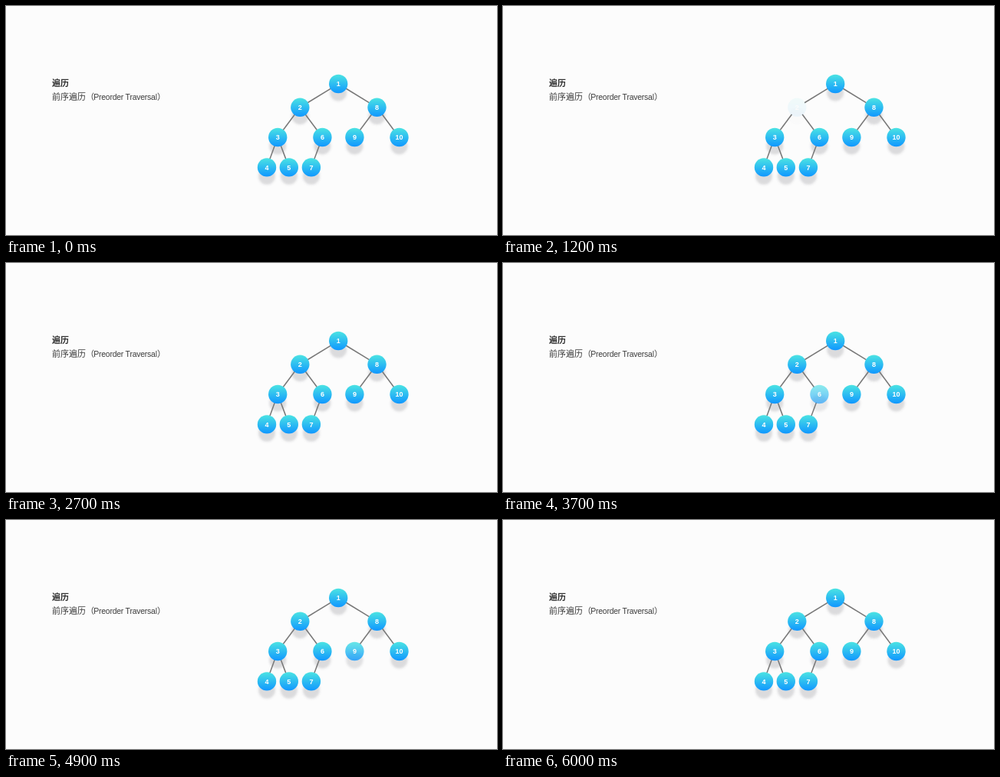
An HTML page for the animation above (6.2 s loop, 640 px wide and 300 px high).

```html
<!DOCTYPE html>
<html lang="zh">
<head>
<meta charset="utf-8">
<title>前序遍历</title>
<style>
  html, body { margin: 0; width: 100%; height: 100%; overflow: hidden; background: #fcfcfc; }
  svg { display: block; width: 640px; height: 300px; }
  .label { font: 300 11px "Noto Sans CJK SC", "Noto Sans CJK", sans-serif; fill: #3c3c3c; }
  .title { font-weight: 700; fill: #333; }
  .latin { font: 400 10.4px "Liberation Sans", Arial, sans-serif; letter-spacing: -.2px; }
  .number { font: 700 9px "Liberation Sans", Arial, sans-serif; fill: #fff; text-anchor: middle; }
  .edge { stroke: #777; stroke-width: 1.5; }
</style>
</head>
<body>
<svg viewBox="0 0 640 300">
  <defs>
    <linearGradient id="blue" x1="0" y1="0" x2="0" y2="1">
      <stop offset="0" stop-color="#4be3e3"/>
      <stop offset="1" stop-color="#1097ff"/>
    </linearGradient>
    <filter id="soft" x="-50%" y="-50%" width="200%" height="200%">
      <feGaussianBlur stdDeviation="1.8"/>
    </filter>
  </defs>
  <text class="label title" x="60" y="105">遍历</text>
  <text class="label" y="123.3"><tspan x="60">前序遍历（</tspan><tspan class="latin" x="114.3">Preorder Traversal</tspan><tspan x="197">）</tspan></text>
  <g id="shadows"></g>
  <g id="edges"></g>
  <g id="discs"></g>
</svg>
<script>
const LOOP = 6200, RADIUS = 12.2;

// Nodes in visiting order: x, y, parent number.
const nodes = [
  [433.2, 102], [383.3, 132.8, 1], [354.2, 172, 2], [340, 211.4, 3], [368.8, 211.4, 3],
  [412.4, 172, 2], [397.9, 211.4, 6], [483.5, 132.8, 1], [454.4, 172, 8], [512.5, 172, 8]
];

// One blink: offset from its darkest moment in ms, opacity.
const blink = [[-220, 1], [0, .06], [120, .06], [320, 1]];
const firstBlink = 660, blinkGap = 540;

const byId = id => document.getElementById(id);
const fill = (id, make) => {
  byId(id).innerHTML = nodes.map(make).join("");
  return [...byId(id).children];
};

const shadows = fill("shadows", ([x, y]) =>
  `<g><circle cx="${x}" cy="${y + 11.5}" r="11" fill="#556" fill-opacity=".2" filter="url(#soft)"/></g>`);

fill("edges", ([x, y, parent]) => {
  if (!parent) return "";
  const [px, py] = nodes[parent - 1];
  const length = Math.hypot(x - px, y - py);
  const dx = (x - px) / length * 11.5, dy = (y - py) / length * 11.5;
  return `<line class="edge" x1="${px + dx}" y1="${py + dy}" x2="${x - dx}" y2="${y - dy}"/>`;
});

const discs = fill("discs", ([x, y], i) =>
  `<g><circle cx="${x}" cy="${y}" r="${RADIUS}" fill="url(#blue)"/>` +
  `<text class="number" x="${x}" y="${y + 3.3}">${i + 1}</text></g>`);

function opacityAt(offset) {
  for (let i = 1; i < blink.length; i++) {
    const [t0, a] = blink[i - 1], [t1, b] = blink[i];
    if (offset >= t0 && offset < t1) return a + (b - a) * (offset - t0) / (t1 - t0);
  }
  return 1;
}

// Five poses per second, held for slightly uneven times.
function poseTime(t) {
  const second = Math.floor(t / 1000);
  const starts = [0, second < 3 ? 200 : 300, 500, 700, 900];
  const pose = starts.filter(start => start <= t % 1000).length - 1;
  return second * 1000 + pose * 200;
}

function draw() {
  const time = poseTime(performance.now() % LOOP);
  nodes.forEach((_, i) => {
    const opacity = opacityAt(time - firstBlink - i * blinkGap);
    shadows[i].style.opacity = discs[i].style.opacity = opacity;
  });
  requestAnimationFrame(draw);
}
draw();
</script>
</body>
</html>
```
